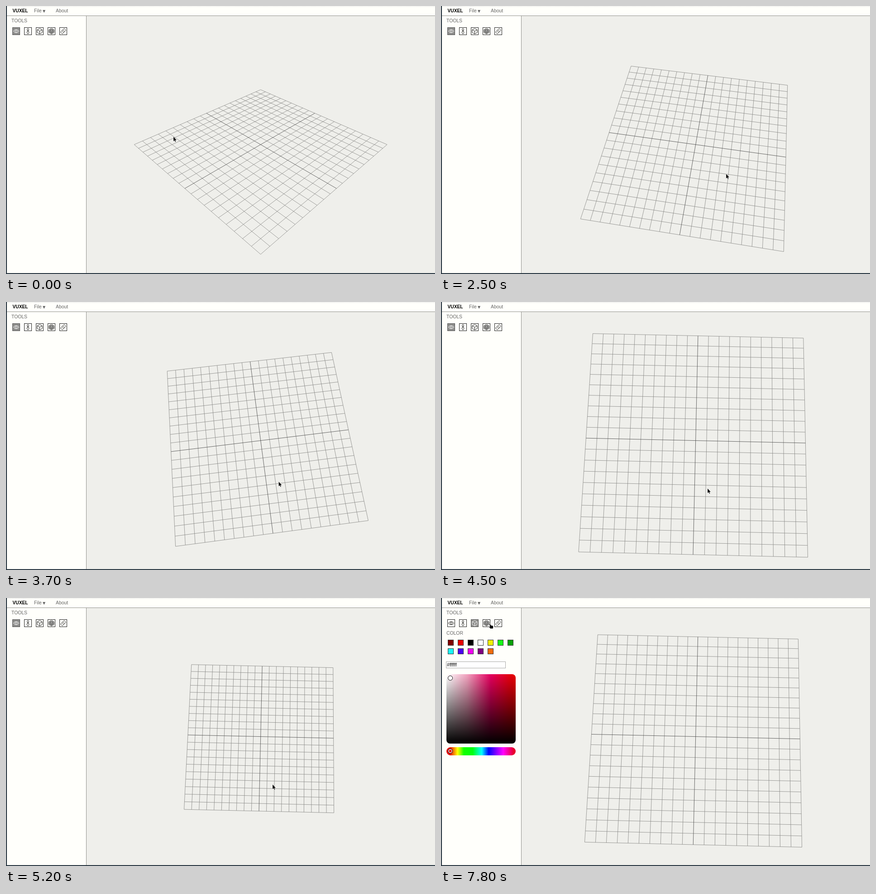
Write an HTML page with a canvas that moves like this. It is 948x591 px and loops after 8000 ms.

```html
<!DOCTYPE html>
<html lang="en">
<head>
<meta charset="utf-8">
<title>Voxel editor</title>
<style>
html, body { margin: 0; width: 100%; height: 100%; overflow: hidden; background: #fffffb; }
body { position: relative; font: 10.4px/12px "Liberation Sans", Arial, sans-serif; color: #666; }
body * { position: absolute; box-sizing: border-box; white-space: nowrap; }
canvas { left: 0; top: 0; }
#frame { inset: 0; border-left: 2px solid #26343f; border-bottom: 2px solid #26343f; }
#bar { left: 2px; right: 0; top: 0; height: 22px; border-bottom: 1px solid #92928e;
  background: linear-gradient(#efefed, #fffffb 3px); }
#bar * { top: 4.5px; }
#bar b { left: 12.5px; font-size: 10.2px; color: #000; }
#bar i { left: 79px; top: 5.5px; font: 8px/12px "DejaVu Sans", sans-serif; }
.label { left: 12px; }
.tool { top: 47px; width: 17px; height: 17px; border: 1px solid #222; color: #111; background: #fffffb; }
.tool svg { left: -1px; top: -1px; width: 17px; height: 17px; fill: none; stroke: currentColor; stroke-width: .9; }
.tool.on { background: #8d8d8b; border-color: #555; color: #fff; }
.swatch { width: 13px; height: 13px; border: 1px solid #333; }
#hex { left: 11px; top: 140px; width: 132px; height: 15px; padding-left: 1px; border: 1px solid #aaa;
  background: #fff; color: #111; font-size: 10.2px; line-height: 13px; }
#shade { left: 11.5px; top: 167.5px; width: 153.5px; height: 153.5px; border-radius: 8px;
  background: linear-gradient(to top, #000, transparent),
    linear-gradient(to right, #fff, #f3a3bf 30%, #e4005e 64%, #e60012 90%, #e80000); }
#hue { left: 11.5px; top: 328.5px; width: 153.5px; height: 18px; border-radius: 9px;
  background: linear-gradient(to right, #e80000 5%, #ff0 16%, #1f0 25%, #0f1 38%,
    #0ff 51%, #00f 61%, #f0f 82%, #e8002a 97%); }
.knob { left: 15px; width: 11px; height: 11px; border: 1.3px solid #000; border-radius: 50%;
  box-shadow: inset 0 0 0 1.5px #fff; }
#pointer { left: 0; top: 0; width: 12px; height: 15px; overflow: visible; stroke: #fff; stroke-width: .4; }
[hidden] { display: none; }
</style>
</head>
<body>
<canvas id="view" width="948" height="591"></canvas>
<div id="bar">
  <b>VUXEL</b>
  <span style="left:60px">File</span><i>▼</i>
  <span style="left:108px">About</span>
</div>
<span class="label" style="top:26.5px">TOOLS</span>
<div id="panel" hidden>
  <span class="label" style="top:71.5px">COLOR</span>
  <div id="hex">#ffffff</div>
  <div id="shade"></div>
  <div id="hue"></div>
  <div class="knob" style="top:171px;background:#fff"></div>
  <div class="knob" style="top:332px;background:#e80000"></div>
</div>
<div id="frame"></div>
<svg id="pointer">
  <path id="arrow" d="M0 0V10.6L2.4 8.5 4 12 5.6 11.2 4.1 7.9H7.2Z"/>
  <path id="hand" d="M.3 1Q1.2 -.3 2.4 .8L4 3.4 7.6 4Q9.2 4.5 9 6.5L8.4 10.5H2.4L.2 7.5Q-.4 6 1.6 5.8Z"/>
</svg>
<script>
const LOOP = 8000, STEP = 100, CX = 562.7, CY = 305.6;
const FOCAL = 283.5 / Math.tan(Math.PI / 8), DIST = 20 * Math.sqrt(3), HALF = 10;
const TURN = 2 * Math.PI / 567; // one full turn per view height dragged
const PICK = 7400, HOVER = 6800;

const START = { x: 370, y: 288 };
const jump = (at, x, y) => ({ from: at, to: at, x, y });
const glide = (from, to, x, y) => ({ from, to, x, y });
const drag = (from, to, x, y, bend = 1) => ({ from, to, x, y, bend, drag: true });
const MOVES = [
  glide(500, 700, 230, 230), jump(800, 254, 231), jump(1000, 441, 320),
  drag(1400, 2000, 639.6, 362.4, 2),
  jump(2500, 630, 370), glide(2500, 3000, 577, 378),
  drag(3000, 3200, 589, 381.5), drag(3200, 3500, 607, 391), drag(3500, 4100, 589, 411),
  jump(6100, 341, 311), jump(6300, 226, 176), jump(6500, 76, 72),
  glide(6600, 6900, 75, 57.5), jump(7800, 106.5, 57)
];
const WHEEL = [
  { from: 4400, to: 4750, clicks: 13 }, { from: 4750, to: 5200, clicks: -17 }, { from: 5200, to: 5500, clicks: 7 }
];
const ICONS = [
  "M2 8.5Q8.5 1.5 15 8.5Q8.5 15.5 2 8.5ZM6.2 8.5a2.3 2.3 0 1 0 4.6 0a2.3 2.3 0 1 0 -4.6 0",
  "M8.5 2L10.5 5 8.5 8 6.5 5ZM8.5 8L11 11 8.5 15 6 11ZM6.5 8H10.5",
  "M8.5 2.5L14 5.5V11.5L8.5 14.5 3 11.5V5.5ZM3 5.5L8.5 8.5 14 5.5M8.5 8.5V14.5",
  "M8.5 2.5L14 5.5V11.5L8.5 14.5 3 11.5V5.5ZM3 5.5L8.5 8.5 14 5.5M8.5 8.5V14.5M5.7 4L11.2 7V13M11.3 4L5.8 7V13M3 8.5L8.5 11.5 14 8.5",
  "M10.5 2.5L14.5 6.5 6.5 14.5 2.5 10.5ZM7.5 5.5L11.5 9.5M5.5 7.5L9.5 11.5"
];
const COLORS = ["#800000", "#e60000", "#000", "#fff", "#f0f000", "#17f817", "#08a008",
  "#19f6f6", "#4b00f0", "#f000f0", "#800080", "#f06c0c"];

const $ = id => document.getElementById(id);
const ctx = $("view").getContext("2d");

function addBox(parent, className, css, html = "") {
  const el = document.createElement("div");
  el.className = className;
  el.style.cssText = css;
  el.innerHTML = html;
  parent.append(el);
  return el;
}

const tools = ICONS.map((d, i) =>
  addBox(document.body, "tool", `left:${14 + 26 * i}px`, `<svg><path d="${d}"/></svg>`));
COLORS.forEach((color, i) =>
  addBox($("panel"), "swatch", `left:${14.5 + 22 * (i % 7)}px;top:${i < 7 ? 92 : 111}px;background:${color}`));
document.body.append($("pointer"));

const progress = ({ from, to }, t) => t >= to ? 1 : Math.max(0, (t - from) / (to - from));
const ease = p => (1 - Math.cos(Math.PI * p)) / 2;

// Dragging the pointer orbits the camera, so its angles follow from the pointer's path.
function follow(t) {
  let { x, y } = START, azimuth = Math.PI / 4, elevation = Math.atan(Math.SQRT1_2);
  for (const move of MOVES) {
    if (t < move.from) break;
    const p = ease(progress(move, t));
    const dx = (move.x - x) * p, dy = (move.y - y) * p ** (move.bend || 1);
    x += dx;
    y += dy;
    if (move.drag) {
      azimuth -= dx * TURN;
      elevation += dy * TURN;
    }
    if (t < move.to) break;
  }
  return { x, y, azimuth, elevation };
}

function distance(t) {
  const clicks = WHEEL.reduce((sum, spin) => sum + spin.clicks * progress(spin, t), 0);
  return DIST * 0.95 ** Math.round(clicks);
}

function drawGrid(azimuth, elevation, dist) {
  const sa = Math.sin(azimuth), ca = Math.cos(azimuth);
  const se = Math.sin(elevation), ce = Math.cos(elevation);
  const project = (u, v) => {
    const x = u * ca + v * sa, z = v * ca - u * sa;
    const scale = FOCAL / (dist + z * ce);
    return [CX + x * scale, CY - z * se * scale];
  };
  const line = (u1, v1, u2, v2) => {
    ctx.moveTo(...project(u1, v1));
    ctx.lineTo(...project(u2, v2));
  };
  const stroke = (color, offsets) => {
    ctx.strokeStyle = color;
    ctx.beginPath();
    for (const k of offsets) {
      line(k, -HALF, k, HALF);
      line(-HALF, k, HALF, k);
    }
    ctx.stroke();
  };
  ctx.fillStyle = "#efefeb";
  ctx.fillRect(177, 21, 771, 570);
  ctx.lineWidth = 0.8;
  const offsets = Array.from({ length: 2 * HALF + 1 }, (_, i) => i - HALF);
  stroke("#848482", offsets.filter(k => k));
  stroke("#404040", [0]);
  ctx.fillStyle = "#fffffb";
  ctx.fillRect(0, 0, 177, 591);
  ctx.fillStyle = "#92928e";
  ctx.fillRect(177, 21, 1, 570);
}

function render(now) {
  const t = Math.floor(now % LOOP / STEP) * STEP;
  const { x, y, azimuth, elevation } = follow(t);
  drawGrid(azimuth, elevation, distance(t));
  $("pointer").style.transform = `translate(${x}px, ${y}px)`;
  $("arrow").style.display = t < HOVER ? "" : "none";
  $("hand").style.display = t < HOVER ? "none" : "";
  $("panel").hidden = t < PICK;
  tools.forEach((tool, i) => tool.classList.toggle("on", i === (t < PICK ? 0 : 2)));
}

const origin = performance.now();
function tick() {
  render(performance.now() - origin);
  requestAnimationFrame(tick);
}
tick();
</script>
</body>
</html>
```
